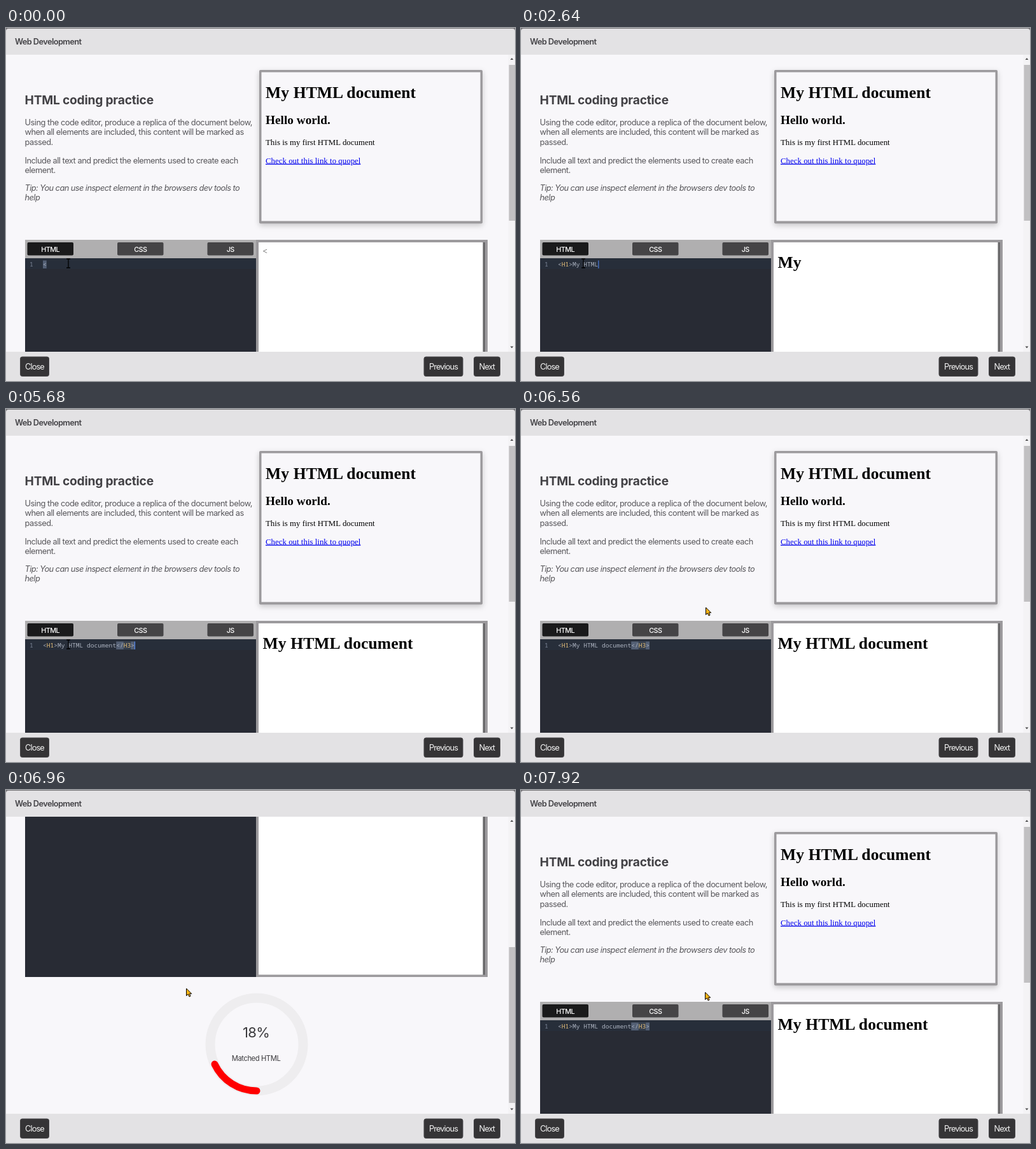
An HTML page for the animation above (8 s loop, 800x555 px).

```html
<!DOCTYPE html>
<html lang="en">
<head>
<meta charset="utf-8">
<title>Web Development</title>
<style>
  html, body { margin: 0; width: 100%; height: 100%; overflow: hidden; background: #f8f7fa; }
  svg { display: block; width: 800px; height: 555px; }
  text { font-family: Inter, sans-serif; font-size: 12.8px; white-space: pre; }
  .copy { fill: #58575b; letter-spacing: -.48px; }
  .copy .tip { font-style: italic; letter-spacing: -.55px; }
  .title { fill: #444347; font-weight: 600; letter-spacing: -.58px; }
  .head { fill: #424145; font-size: 19.2px; font-weight: 700; letter-spacing: -.2px; }
  .doc text { font-family: "Liberation Serif", serif; fill: #000; letter-spacing: .04px; }
  .doc .h1 { font-size: 25.6px; font-weight: 700; letter-spacing: .1px; }
  .doc .h2 { font-size: 19.2px; font-weight: 700; }
  .doc .link { fill: #0000ee; text-decoration: underline; }
  .tab text { fill: #fff; font-size: 10.8px; font-weight: 500; letter-spacing: -.55px; text-anchor: middle; }
  .code text { font-family: "Noto Sans Mono", monospace; font-size: 9.6px; fill: #abb2bf; }
  .code .tag { fill: #e5c07b; }
  .button rect { fill: #353436; stroke: #48474a; }
  .button text { fill: #f4f4f4; letter-spacing: -.9px; }
  .score { fill: #3b3a3d; text-anchor: middle; }
  .percent { font-size: 22px; letter-spacing: -.7px; }
  .label { font-size: 11.2px; letter-spacing: -.4px; }
  .ring { fill: none; stroke: #eeedef; stroke-width: 15; }
  .arc { fill: none; stroke: #f00; stroke-width: 11; stroke-linecap: round; }
</style>
</head>
<body>
<svg viewBox="0 0 800 555">
  <defs>
    <filter id="shadow" x="-10%" y="-10%" width="120%" height="125%">
      <feDropShadow dx="0" dy="3" stdDeviation="4" flood-opacity=".2"/>
    </filter>
  </defs>
  <rect width="800" height="555" fill="#f8f7fa"/>

  <g id="page">
    <text class="head" x="29.5" y="120">HTML coding practice</text>
    <g class="copy">
      <text x="29.5" y="153">Using the code editor, produce a replica of the document below,</text>
      <text x="29.5" y="168.3">when all elements are included, this content will be marked as</text>
      <text x="29.5" y="183.7">passed.</text>
      <text x="29.5" y="212.5">Include all text and predict the elements used to create each</text>
      <text x="29.5" y="227.8">element.</text>
      <text class="tip" x="29.5" y="255.5">Tip: You can use inspect element in the browsers dev tools to</text>
      <text class="tip" x="29.5" y="270.8">help</text>
    </g>

    <g class="doc">
      <rect x="398" y="66" width="351" height="241.5" rx="2" fill="#9c9a9d" filter="url(#shadow)"/>
      <rect x="401.5" y="69.5" width="344" height="234" fill="#f8f7fa"/>
      <text class="h1" x="408" y="110">My HTML document</text>
      <text class="h2" x="408" y="151">Hello world.</text>
      <text x="408" y="184">This is my first HTML document</text>
      <text class="link" x="408" y="212.5">Check out this link to quopel</text>
    </g>

    <rect x="30" y="333" width="364" height="29" fill="#b0afb0"/>
    <g class="tab">
      <rect x="33.5" y="337" width="72.5" height="20.5" rx="2" fill="#1a1a1b"/>
      <rect x="175" y="337" width="72.5" height="20.5" rx="2" fill="#454446"/>
      <rect x="316.5" y="337" width="72.5" height="20.5" rx="2" fill="#454446"/>
      <text x="69.7" y="351.5">HTML</text>
      <text x="211.3" y="351.5">CSS</text>
      <text x="352.7" y="351.5">JS</text>
    </g>
    <rect x="30" y="362" width="364" height="293" fill="#282b34"/>
    <rect x="30" y="362" width="364" height="17" fill="#272e3a"/>
    <g class="code">
      <rect id="mark" y="365.5" height="12.5" fill="#bad0f8" fill-opacity=".3"/>
      <rect id="dim" x="184.7" y="365.5" width="11.5" height="12.5" fill="#272e3a" fill-opacity=".65"/>
      <text x="37" y="375" style="fill:#7d8799">1</text>
      <text id="code" x="58" y="375"></text>
      <rect id="caret" y="365.5" width="1" height="12.5" fill="#528bff"/>
    </g>

    <g class="doc">
      <rect x="393" y="333" width="364" height="322" fill="#9c9a9d"/>
      <rect x="397" y="337" width="356" height="314.5" fill="#69686a"/>
      <rect x="397" y="337" width="352.5" height="314.5" fill="#fff"/>
      <text id="plain" x="403.5" y="355" style="fill:#333"></text>
      <text id="out" class="h1" x="403.5" y="377"></text>
    </g>

    <circle class="ring" cx="394" cy="761" r="73"/>
    <path id="arc" class="arc"/>
    <text class="score percent" x="393" y="750">18%</text>
    <text class="score label" x="393" y="786.5">Matched HTML</text>
  </g>

  <rect x="789.5" y="42" width="10.5" height="467" fill="#f4f3f5"/>
  <rect id="thumb" x="790.5" width="9.5" height="245" fill="#c1c0c2"/>
  <path d="M792.5 50h5l-2.5-3zM792.5 500.5h5l-2.5 3z" fill="#4f4f50"/>

  <path d="M0 0H800V42H0z" fill="#737275"/>
  <path d="M0 42V5Q0 1 4 1H796Q800 1 800 5V42z" fill="#e3e2e4"/>
  <text class="title" x="14" y="26">Web Development</text>
  <rect y="509" width="800" height="46" fill="#e3e2e4"/>
  <g class="button">
    <rect x="22.5" y="517" width="45" height="30.5" rx="3"/>
    <rect x="657" y="517" width="61" height="30.5" rx="3"/>
    <rect x="735.5" y="517" width="41" height="30.5" rx="3"/>
    <text x="30" y="537">Close</text>
    <text x="665" y="537">Previous</text>
    <text x="743.5" y="537">Next</text>
  </g>

  <path id="beam" d="M-3-7h2.5l.5.5l.5-.5H3M0-6.5V6.5M-3 7h2.5l.5-.5l.5.5H3" fill="none" stroke="#000" stroke-width="1.3"/>
  <path id="arrow" d="M0 0V11.5L2.7 9L4.6 13L6.6 12L4.8 8.3H8.2z" fill="#fdb515" stroke="#000"/>
</svg>
<script>
  const $ = id => document.getElementById(id);
  const LOOP = 8000, CHAR = 5.76, DELAY = 240;
  const CODE = '<H1>My HTML document</H3>';
  // Time at which each character of CODE is typed
  const KEYS = [-700, 320, 560, 880, 1280, 1440, 2000, 2240, 2320, 2400, 2560, 3040,
    3200, 3280, 3440, 3600, 3760, 3840, 3920, 4080, 4400, 4960, 5280, 5440, 5680];
  // Highlighted brackets by typed length: [first, count]
  const MARKS = { 1: [0, 1], 4: [0, 4], 21: [20, 1], 22: [20, 2], 25: [20, 5] };
  const MOUSE = [[0, 98, 370], [6080, 98, 370], [6400, 290.5, 312], [6640, 290.5, 312],
    [6880, 283.5, 312], [7040, 283.5, 312], [7520, 290.5, 318], [7760, 289.5, 318],
    [LOOP, 289.5, 318]];

  const smooth = (t, a, b) => {
    const p = Math.min(1, Math.max(0, (t - a) / (b - a)));
    return p * p * (3 - 2 * p);
  };
  const show = (el, on) => el.setAttribute('visibility', on ? 'visible' : 'hidden');
  const move = (el, x, y) => el.setAttribute('transform', `translate(${x} ${y})`);

  const angle = 2 * Math.PI * .18;
  $('arc').setAttribute('d',
    `M394 834A73 73 0 0 1 ${394 - 73 * Math.sin(angle)} ${761 + 73 * Math.cos(angle)}`);

  const spans = CODE.split(/(H\d)/).map((part, i) => {
    const el = document.createElementNS('http://www.w3.org/2000/svg', 'tspan');
    if (i % 2) el.setAttribute('class', 'tag');
    $('code').append(el);
    return { el, part };
  });

  function drawCode(t) {
    const n = KEYS.filter(k => k <= t).length;
    let left = n;
    for (const { el, part } of spans) {
      el.textContent = part.slice(0, Math.max(0, left));
      left -= part.length;
    }
    const mark = MARKS[n];
    show($('mark'), mark);
    show($('dim'), n === CODE.length);
    if (mark) {
      $('mark').setAttribute('x', 58 + mark[0] * CHAR);
      $('mark').setAttribute('width', mark[1] * CHAR);
    }
    $('caret').setAttribute('x', 58 + n * CHAR);
    show($('caret'), (t - KEYS[n - 1]) % 1200 < 600);
  }

  // The preview follows once typing has rested for DELAY
  function drawPreview(t) {
    let n = 1;
    KEYS.forEach((k, i) => {
      const next = KEYS[i + 1] ?? Infinity;
      if (k + DELAY <= t && next - k >= DELAY) n = i + 1;
    });
    $('plain').textContent = n === 1 ? '<' : '';
    $('out').textContent = n < 4 ? '' : CODE.slice(4, n).replace(/<\/H.*/, '');
  }

  function drawMouse(t) {
    const i = MOUSE.findIndex(m => m[0] > t);
    const [t0, x0, y0] = MOUSE[i - 1], [t1, x1, y1] = MOUSE[i];
    const p = smooth(t, t0, t1), x = x0 + (x1 - x0) * p, y = y0 + (y1 - y0) * p;
    const text = y > 361;
    show($('beam'), text);
    show($('arrow'), !text);
    move($(text ? 'beam' : 'arrow'), x, y);
  }

  function draw() {
    const t = performance.now() % LOOP;
    const scroll = Math.floor(361 * (smooth(t, 6640, 6900) - smooth(t, 7440, 7740)));
    move($('page'), 0, -scroll);
    $('thumb').setAttribute('y', 58 + scroll * .5236);
    drawCode(t);
    drawPreview(t);
    drawMouse(t);
    requestAnimationFrame(draw);
  }
  draw();
</script>
</body>
</html>
```
